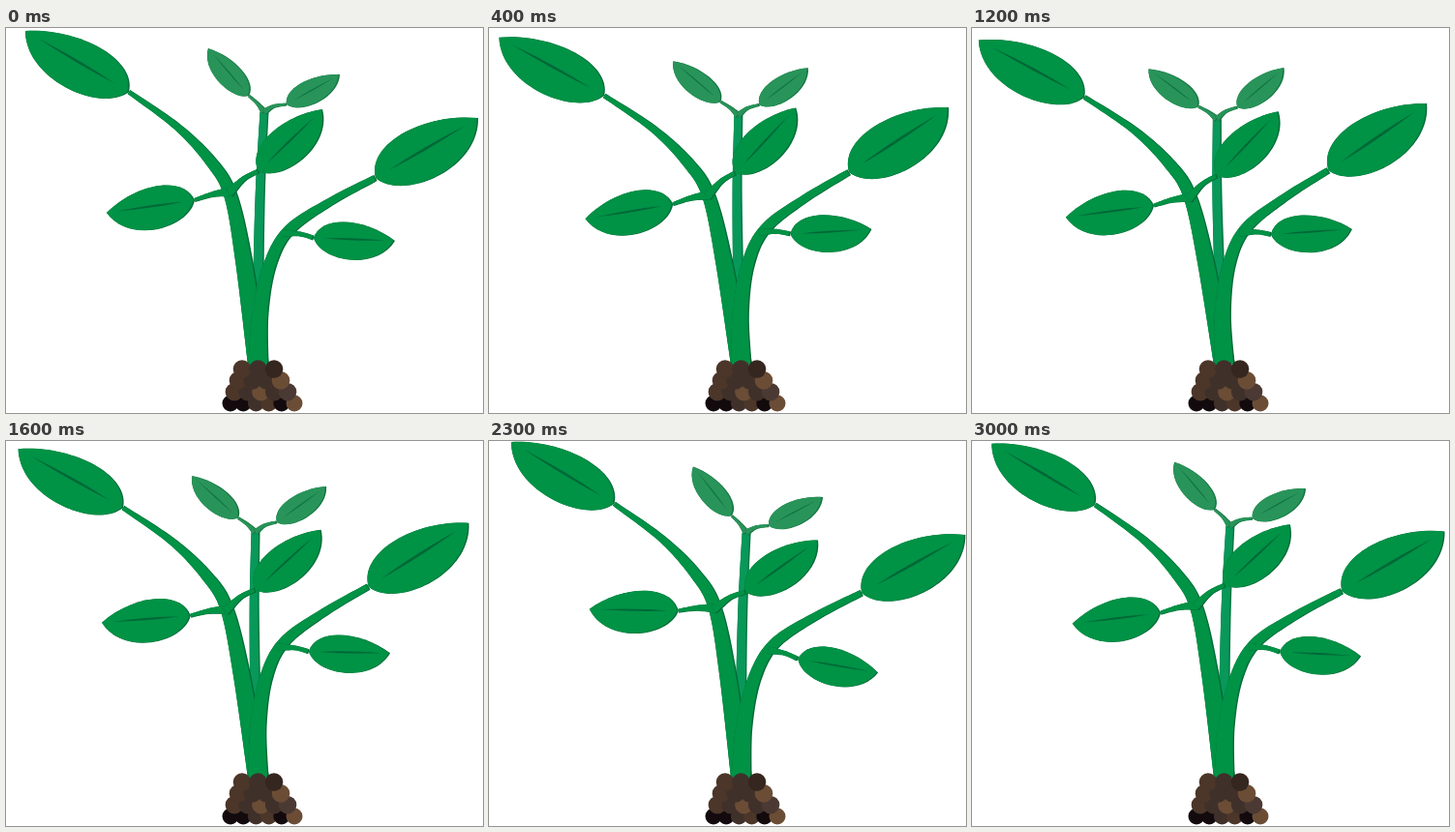
Write an HTML page with a canvas that moves like this. It is 493 px wide and 398 px high and loops after 3.1 s.

```html
<!DOCTYPE html>
<html lang="en">
<head>
<meta charset="utf-8">
<title>Swaying seedling</title>
<style>
html, body { margin: 0; width: 100%; height: 100%; overflow: hidden; background: #fff; }
canvas { display: block; }
</style>
</head>
<body>
<canvas id="stage" width="493" height="398"></canvas>
<script>
const ctx = document.getElementById('stage').getContext('2d');
const LOOP = 3100, STEP = 100, LEFT_AT = 800, RIGHT_AT = 2300;
const GREEN = { fill: '#009245', shade: '#006837' };
const INNER = { fill: '#089859', shade: '#00743f' };
const PALE = { fill: '#289459', shade: '#12713f' };

// Every part turns rigidly about its joint, which its parent carries along.
// left and right give the turn in degrees and the drop in pixels at each extreme.
// Stem points are x, y, width; the leaf grows from the last one to its tip.
const root = { joint: [261, 348], left: [0, 0], right: [0, 0] };
const centre = {
  parent: root, joint: root.joint, left: [-4, 7], right: [-.2, 8], paint: INNER,
  stem: [[261, 348, 11], [261, 260, 11], [263, 165, 10], [267, 87, 9]]
};
const leftBranch = {
  parent: root, joint: root.joint, left: [-3.2, 0], right: [.5, 0], paint: GREEN,
  stem: [[261, 348, 22], [246, 240, 18], [232, 172, 14], [212, 138, 12], [177, 102, 8], [127, 66, 5]],
  tip: [20, 3], plump: .96
};
const rightBranch = {
  parent: root, joint: root.joint, left: [-5.7, 0], right: [1, 0], paint: GREEN,
  stem: [[261, 348, 21], [263, 295, 17], [273, 245, 14], [293, 209, 12], [335, 180, 9], [382, 155, 7]],
  tip: [488, 93], plump: 1.03
};
const parts = [
  centre,
  {
    parent: centre, joint: [267, 87], left: [-17.8, 0], right: [2.5, 0], paint: PALE,
    stem: [[267, 87, 7], [260, 78, 4], [251, 70, 3]], tip: [209, 21], plump: .9
  },
  {
    parent: centre, joint: [267, 87], left: [-15.6, 0], right: [1.5, 0], paint: PALE,
    stem: [[267, 87, 7], [277, 81, 4], [290, 79, 3]], tip: [345, 48], plump: .92
  },
  leftBranch,
  rightBranch,
  {
    parent: leftBranch, joint: [232, 170], left: [-2.6, 5], right: [9.3, 4], paint: GREEN,
    stem: [[234, 169, 10], [214, 172, 6], [195, 178, 4]], tip: [104, 191], plump: 1.08
  },
  {
    parent: rightBranch, joint: [289, 211], left: [-10.8, 0], right: [7.7, 4], paint: GREEN,
    stem: [[286, 212, 8], [304, 213, 5], [318, 217, 5]], tip: [402, 220], plump: 1.04
  },
  {
    parent: leftBranch, joint: [232, 170], left: [-6.1, 5], right: [8.4, 4], paint: GREEN,
    stem: [[231, 171, 10], [246, 156, 6], [261, 148, 5]], tip: [327, 84], plump: 1.03
  }
];

// Share of the left and right extremes at a given time.
function sway(t) {
  if (t < LEFT_AT) return [t / LEFT_AT, 0];
  if (t < RIGHT_AT) {
    const k = (t - LEFT_AT) / (RIGHT_AT - LEFT_AT);
    return [1 - k, k];
  }
  return [0, (LOOP - t) / (LOOP - RIGHT_AT)];
}

function placement({ parent, joint: [x, y], left, right }, share) {
  const [turn, drop] = [0, 1].map(i => left[i] * share[0] + right[i] * share[1]);
  const base = parent ? placement(parent, share) : new DOMMatrix();
  const at = base.transformPoint(new DOMPoint(x, y));
  return new DOMMatrix().translate(at.x, at.y + drop).rotate(turn).translate(-x, -y);
}

const spline = (a, b, c, d, k) =>
  b + .5 * k * (c - a + k * (2 * a - 5 * b + 4 * c - d + k * (3 * (b - c) + d - a)));

function stemPath(points) {
  const last = points.length - 1, line = [], perSpan = 12;
  for (let n = 0; n <= last * perSpan; n++) {
    const i = Math.min(last - 1, Math.floor(n / perSpan)), k = n / perSpan - i;
    const near = [i - 1, i, i + 1, i + 2].map(j => points[Math.max(0, Math.min(last, j))]);
    line.push([0, 1, 2].map(c => spline(...near.map(p => p[c]), k)));
  }
  const side = sign => line.map(([x, y, w], i) => {
    const a = line[Math.max(0, i - 1)], b = line[Math.min(line.length - 1, i + 1)];
    const dx = b[0] - a[0], dy = b[1] - a[1], k = sign * w / 2 / Math.hypot(dx, dy);
    return [x - dy * k, y + dx * k];
  });
  const path = new Path2D();
  for (const [x, y] of [...side(1), ...side(-1).reverse()]) path.lineTo(x, y);
  path.closePath();
  return path;
}

// Leaf outline and vein along a unit axis from base to tip.
const blade = new Path2D('M0 0C.08 .28 .63 .26 1 0C.79 -.37 .1 -.28 0 0Z');
const vein = new Path2D('M.13 0Q.45 .025 .88 0Q.45 -.02 .13 0Z');

function leafShapes([bx, by], [tx, ty], plump) {
  const size = Math.hypot(tx - bx, ty - by), flip = tx > bx ? -1 : 1;
  const placed = new DOMMatrix()
    .translate(bx, by)
    .rotate(Math.atan2(ty - by, tx - bx) * 180 / Math.PI)
    .scale(size, size * plump * flip);
  return [blade, vein].map(shape => {
    const path = new Path2D();
    path.addPath(shape, placed);
    return path;
  });
}

for (const part of parts) {
  part.stemShape = stemPath(part.stem);
  if (part.tip) [part.blade, part.vein] = leafShapes(part.stem.at(-1), part.tip, part.plump);
}

// Light falls from the left, leaving a thin dark rim on the right.
function fillShaded(path, { fill, shade }) {
  ctx.fillStyle = shade;
  ctx.fill(path);
  ctx.save();
  ctx.clip(path);
  ctx.translate(-1.4, -.2);
  ctx.fillStyle = fill;
  ctx.fill(path);
  ctx.restore();
}

function drawPart(part, share) {
  ctx.setTransform(placement(part, share));
  fillShaded(part.stemShape, part.paint);
  if (part.tip) {
    fillShaded(part.blade, part.paint);
    ctx.fillStyle = part.paint.shade;
    ctx.fill(part.vein);
  }
  ctx.resetTransform();
}

// Soil is a heap of rows, each one crumb shorter than the row below.
const soil = { k: '#120a0d', s: '#35261f', d: '#40302a', b: '#4b3629', g: '#4b3933', t: '#6b4d36' };
const rows = ['kkdbkt', 'bdtdg', 'bddt', 'bds'];

function drawSoil() {
  rows.forEach((row, r) => [...row].forEach((tone, i) => {
    const from = 232 + 4 * r, to = 298 - 7 * r;
    ctx.fillStyle = soil[tone];
    ctx.beginPath();
    ctx.arc(from + (to - from) * i / (row.length - 1), 388 - 11.8 * r, r ? 9.3 : 8.5, 0, Math.PI * 2);
    ctx.fill();
  }));
}

function draw(t) {
  ctx.fillStyle = '#fff';
  ctx.fillRect(0, 0, 493, 398);
  const share = sway(t);
  for (const part of parts) drawPart(part, share);
  drawSoil();
}

const start = performance.now();
function tick() {
  const elapsed = Math.max(0, performance.now() - start) % LOOP;
  draw(Math.floor(elapsed / STEP) * STEP);
  requestAnimationFrame(tick);
}
tick();
</script>
</body>
</html>
```
